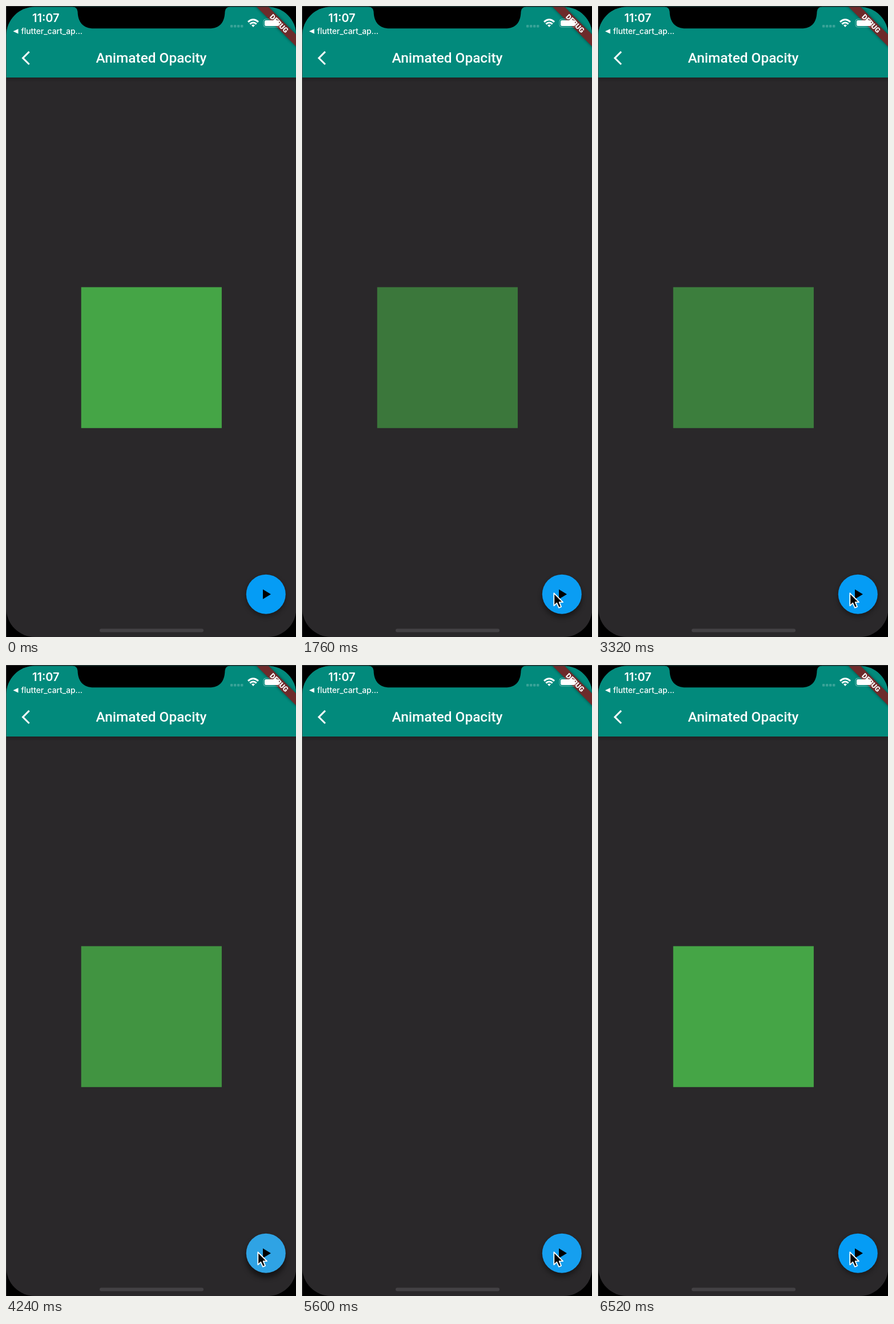
Write an HTML page that moves like this. It is 508 by 1103 pixels and loops after 6.56 s.

```html
<!DOCTYPE html>
<html lang="en">
<head>
<meta charset="utf-8">
<title>Animated Opacity</title>
<style>
  html, body { margin: 0; width: 100%; height: 100%; overflow: hidden; background: #000; }
  svg { display: block; width: 100%; height: 100%; }
  text { fill: #fff; }
  .status { font-family: Inter, sans-serif; }
  .app { font-family: Roboto, sans-serif; }
</style>
</head>
<body>
<svg viewBox="0 0 508 1103">
  <defs>
    <clipPath id="screen"><rect x="0.5" y="1.5" width="508" height="1101.5" rx="50"/></clipPath>
    <filter id="soft" x="-50%" y="-50%" width="200%" height="200%"><feGaussianBlur stdDeviation="5"/></filter>
    <filter id="small" x="-50%" y="-50%" width="200%" height="200%"><feGaussianBlur stdDeviation="2.5"/></filter>
    <linearGradient id="drop" x2="0" y2="1">
      <stop offset="0" stop-color="#000" stop-opacity=".18"/>
      <stop offset="1" stop-color="#000" stop-opacity="0"/>
    </linearGradient>
  </defs>
  <rect width="508" height="1103" fill="#000"/>
  <g clip-path="url(#screen)">
    <rect width="508" height="1103" fill="#2a282a"/>
    <rect y="125" width="508" height="9" fill="url(#drop)"/>
    <rect width="508" height="125" fill="#028a7c"/>

    <rect id="box" x="131.7" y="491.5" width="246.2" height="246.3" fill="#45a546"/>

    <circle id="shade" cx="455.3" cy="1032" r="34" filter="url(#soft)"/>
    <circle id="fab" cx="455.3" cy="1028.2" r="34.5"/>
    <path d="M450 1019.7L464 1028.2L450 1036.7Z"/>

    <path transform="translate(27.4 76.2) scale(1.227)" fill="#fff"
          d="M11.67 3.87L9.9 2.1L0 12L9.9 21.9L11.67 20.13L3.54 12Z"/>
    <text class="app" x="254.5" y="99" text-anchor="middle" font-size="24.4" font-weight="500">Animated Opacity</text>

    <g transform="translate(508 1) rotate(45)">
      <rect x="-60" y="34.4" width="120" height="14.7" opacity=".5" filter="url(#small)"/>
      <rect x="-60" y="34.4" width="120" height="14.7" fill="#6d2b2b"/>
    </g>

    <text class="status" x="46" y="28" font-size="20" font-weight="600">11:07</text>
    <path d="M12.5 44.3L21.5 40V48.6Z" fill="#fff"/>
    <text class="status" x="26.5" y="49" font-size="13.8" font-weight="500">flutter_cart_ap...</text>
    <g fill="#fff" opacity=".22">
      <rect x="393" y="33" width="4.4" height="4.4" rx="1"/>
      <rect x="399" y="33" width="4.4" height="4.4" rx="1"/>
      <rect x="405" y="33" width="4.4" height="4.4" rx="1"/>
      <rect x="411" y="33" width="4.4" height="4.4" rx="1"/>
    </g>
    <g fill="none" stroke="#fff" stroke-width="3">
      <path d="M424 27.8Q433 19.8 442 27.8"/>
      <path d="M427.3 31.5Q433 26.6 438.7 31.5"/>
      <path d="M430 33.6Q433 31.2 436 33.6L433 37Z" fill="#fff" stroke="none"/>
    </g>
    <rect x="451" y="23" width="29" height="14" rx="4" fill="none" stroke="#fff" stroke-opacity=".4"/>
    <rect x="453" y="25" width="25" height="10" rx="2.5" fill="#fff"/>
    <path d="M482 27.5q2.5 2.5 0 5z" fill="#fff" opacity=".4"/>
    <g transform="translate(508 1) rotate(45)">
      <text class="app" y="46.2" text-anchor="middle" font-size="12.5" font-weight="900">DEBUG</text>
    </g>

    <path d="M117 0V1.5Q125 2 125.5 10C126 28 135 39.3 154 39.3H356C375 39.3 383 28 383.5 10Q384 2 392 1.5V0Z"/>
    <rect x="164" y="1088.5" width="182" height="6" rx="3" fill="#434144"/>
  </g>
  <path d="M0 0.5H508M0.5 0V1103" stroke="#777" stroke-opacity=".4"/>
  <path id="cursor" d="M0 0V22L5 17.4L8.7 25.6L12.8 23.9L9.4 15.8H15.8Z" fill="#000" stroke="#fff" stroke-width="1.8" stroke-linejoin="round"/>
</svg>
<script>
  const LOOP = 6560, STEP = 40, FADE = 500;
  const TAPS = [1580, 2975, 4175, 5620];
  const get = id => document.getElementById(id);
  const box = get('box'), fab = get('fab'), shade = get('shade'), cursor = get('cursor');
  const clamp = v => Math.max(0, Math.min(1, v));
  const ramp = (t, a, b) => clamp((t - a) / (b - a));
  const mix = (a, b, k) => a.map((v, i) => Math.round(v + (b[i] - v) * k));

  // Each tap reverses the fade of the square.
  const opacity = t => TAPS.reduce(
    (o, tap, i) => o + (i % 2 ? 1 : -1) * ramp(t, tap, tap + FADE), 1);

  // Press feedback rises just before release and dies away afterwards.
  const press = (t, tail) => Math.max(...TAPS.map(
    tap => ramp(t, tap - 65, tap + 55) * (1 - ramp(t, tap + 70, tap + tail))));

  function draw(t) {
    box.setAttribute('opacity', clamp(opacity(t)));
    fab.setAttribute('fill', `rgb(${mix([5, 156, 245], [47, 163, 228], press(t, 195))})`);

    const lift = press(t, 300);
    shade.setAttribute('cy', 1032 + 4 * lift);
    shade.setAttribute('r', 34 + lift);
    shade.setAttribute('opacity', 0.42 + 0.08 * lift);

    const k = 1 - (1 - ramp(t, 320, 880)) ** 3;
    cursor.setAttribute('transform', `translate(${428 + 13.3 * k} ${1106 - 79.7 * k})`);
  }

  const start = performance.now();
  function tick() {
    const t = (performance.now() - start) % LOOP;
    draw(Math.floor(t / STEP) * STEP);
    requestAnimationFrame(tick);
  }
  draw(0);
  requestAnimationFrame(tick);
</script>
</body>
</html>
```
